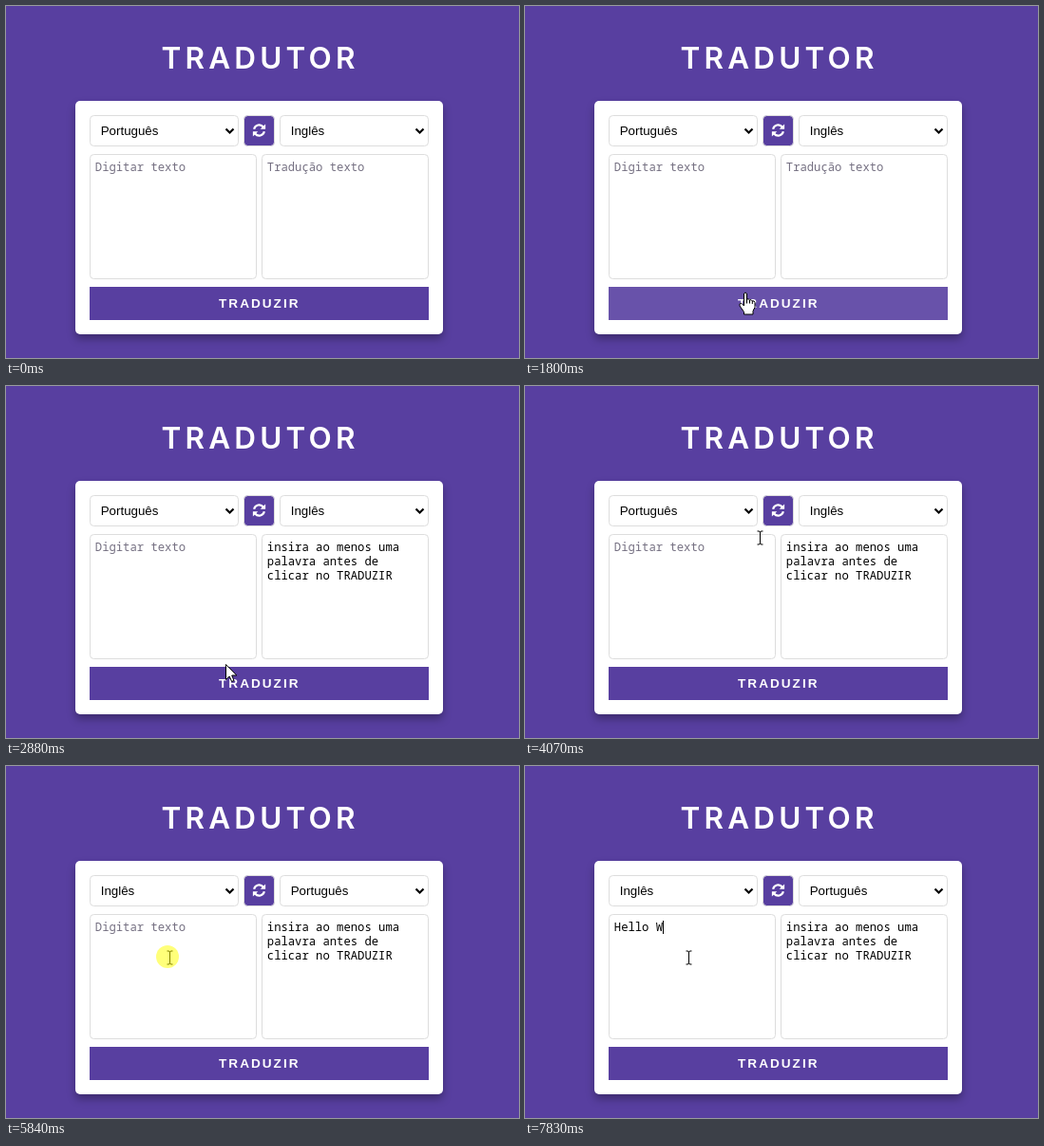
Recreate the animation shown at these times as an HTML page. Size 540 by 371 pixels, loop 8 s.

```html
<!DOCTYPE html>
<html lang="pt">
<head>
<meta charset="utf-8">
<title>Tradutor</title>
<style>
  html, body { margin: 0; width: 100%; height: 100%; overflow: hidden; background: #583fa0; }
  svg { display: block; width: 540px; height: 371px; }
  .card { fill: #fff; filter: drop-shadow(0 5px 4px rgba(0, 0, 0, .3)); }
  .field { fill: #fff; stroke: #ddd; }
  .purple { fill: #583fa0; }
  .title { font: 600 31.5px Inter, sans-serif; letter-spacing: 4.2px; fill: #fff; text-anchor: middle; }
  .label { font: bold 13.6px "Liberation Sans", Arial, sans-serif; letter-spacing: 2px; fill: #fff; text-anchor: middle; }
  .option { font: 13.33px "Liberation Sans", Arial, sans-serif; }
  .mono { font: 12.22px "Noto Sans Mono", monospace; white-space: pre; }
  .hint { fill: #757082; }
  .chevron { fill: none; stroke: #000; stroke-width: 2.2; }
  .pointer { fill: #fff; stroke: #000; stroke-linejoin: round; }
  .beam { fill: none; stroke: #000; }
</style>
</head>
<body>
<svg viewBox="0 0 540 371">
  <defs>
    <path id="chevron" class="chevron" d="M-4 -2L0 2L4 -2"/>
    <g id="half">
      <path d="M-5.4 -1.3A5.5 5.5 0 0 1 4.3 -3.5" fill="none" stroke="#fff" stroke-width="2.2"/>
      <path d="M6.6 -6.6V-1.2H1.2Z" fill="#fff"/>
    </g>
  </defs>

  <text class="title" x="267.6" y="66">TRADUTOR</text>
  <rect class="card" x="73" y="100" width="387" height="246" rx="5"/>

  <rect class="field" x="88.5" y="115.5" width="156" height="32" rx="4"/>
  <rect class="field" x="288.5" y="115.5" width="156" height="32" rx="4"/>
  <text class="option" id="from" x="99.7" y="136"></text>
  <text class="option" id="to" x="299.7" y="136"></text>
  <use href="#chevron" x="235.5" y="131.5"/>
  <use href="#chevron" x="435.5" y="131.5"/>

  <rect class="purple" x="250.5" y="115.5" width="32" height="32" rx="4" stroke="#ddd"/>
  <g transform="translate(266.5 131)">
    <use href="#half"/>
    <use href="#half" transform="rotate(180)"/>
  </g>

  <rect class="field" x="88.5" y="156.5" width="175" height="131" rx="4"/>
  <rect class="field" x="269.5" y="156.5" width="175" height="131" rx="4"/>
  <text class="mono" id="input" x="93.8" y="174"></text>
  <path id="caret" d="M0 163V177" stroke="#000"/>
  <text class="mono hint" id="outputHint" x="274.8" y="174">Tradução texto</text>
  <text class="mono" id="message">
    <tspan x="274.8" y="174">insira ao menos uma</tspan>
    <tspan x="274.8" y="189">palavra antes de</tspan>
    <tspan x="274.8" y="204">clicar no TRADUZIR</tspan>
  </text>

  <rect class="purple" id="button" x="88" y="296" width="357" height="35"/>
  <text class="label" x="266.8" y="318">TRADUZIR</text>

  <g id="cursor">
    <path id="arrow" class="pointer" d="M.5 .5V16.5L4.2 13L6.6 18.5L9 17.5L6.7 12H11.8Z"/>
    <g id="hand" class="pointer">
      <path d="M-1.5 1Q0 -1 1.5 1V7.2Q3.2 6 4.5 7.9Q6.3 6.9 7.3 9Q9.6 8.3 10 10.5V15.5L8 19.5V23H-1.5V20.5L-6 14Q-6.8 11.2 -4.2 11.3L-1.5 14Z"/>
      <path fill="none" d="M1.5 7V11.5M4.5 8V11.5M7.3 9V12"/>
    </g>
    <path id="beam" class="beam" d="M-2.5 -7H-1Q.5 -7 .5 -5.5Q.5 -7 2 -7H3.5M.5 -6V6M-2.5 7H-1Q.5 7 .5 5.5Q.5 7 2 7H3.5"/>
    <circle id="click" cx="-2" cy="-1" r="12" fill="#ff0" fill-opacity=".52"/>
  </g>
</svg>
<script>
  const LOOP = 8000, STEP = 70, CHAR = 7.33;
  const el = id => document.getElementById(id);
  const show = (id, on) => el(id).setAttribute('visibility', on ? 'visible' : 'hidden');
  const between = (t, a, b) => t >= a && t < b;

  // Pointer path: time, x, y
  const path = [
    [270, 198, 2], [830, 217, 131], [1040, 221, 184], [1600, 231, 290], [1800, 232, 302],
    [2670, 232, 302], [2880, 231, 293], [3510, 241, 223], [4070, 247, 160], [4350, 259, 144],
    [4560, 264, 135], [4840, 264, 135], [5160, 180, 199], [5440, 172, 202]
  ];
  const phases = [270, 1170, 2740, 5160];
  const clicks = [[2000, 2130], [4630, 4770], [5840, 6040]];
  const keys = [6640, 6970, 7110, 7240, 7370, 7570, 7830];

  // Areas: left, top, right, bottom
  const handAreas = [[88, 115, 245, 148], [250, 115, 283, 148], [288, 115, 445, 148], [88, 296, 445, 331]];
  const textAreas = [[166, 38, 366, 70], [88, 156, 264, 288], [269, 156, 445, 288]];
  const inside = (areas, x, y) => areas.some(([l, t, r, b]) => x >= l && x < r && y >= t && y < b);

  function pointerAt(t) {
    const base = phases.filter(p => p <= t).pop() ?? t;
    const s = base + Math.floor((t - base) / STEP) * STEP;
    const i = path.findIndex(p => p[0] > s);
    if (i < 0) return path.at(-1).slice(1);
    if (i === 0) return path[0].slice(1);
    const [a, b] = [path[i - 1], path[i]];
    const k = (s - a[0]) / (b[0] - a[0]);
    return [1, 2].map(n => Math.round(a[n] + (b[n] - a[n]) * k));
  }

  function draw(t) {
    const [x, y] = pointerAt(t);
    const visible = t >= 270;
    const hand = inside(handAreas, x, y), beam = inside(textAreas, x, y);
    el('cursor').setAttribute('transform', `translate(${x} ${y})`);
    show('hand', visible && hand);
    show('beam', visible && beam);
    show('arrow', visible && !hand && !beam);
    show('click', clicks.some(c => between(t, ...c)));
    el('button').style.fill = visible && y >= 296 ? '#6852aa' : '';

    const swapped = t >= 4770;
    el('from').textContent = swapped ? 'Inglês' : 'Português';
    el('to').textContent = swapped ? 'Português' : 'Inglês';

    const answered = t >= 2130;
    show('outputHint', !answered);
    show('message', answered);

    const typed = keys.filter(k => k <= t).length;
    el('input').textContent = typed ? 'Hello W'.slice(0, typed) : 'Digitar texto';
    el('input').classList.toggle('hint', !typed);
    el('caret').setAttribute('transform', `translate(${Math.floor(94 + typed * CHAR) + .5} 0)`);
    show('caret', between(t, 5910, 6440) || typed > 0);
  }

  function tick() {
    draw(performance.now() % LOOP);
    requestAnimationFrame(tick);
  }
  tick();
</script>
</body>
</html>
```
